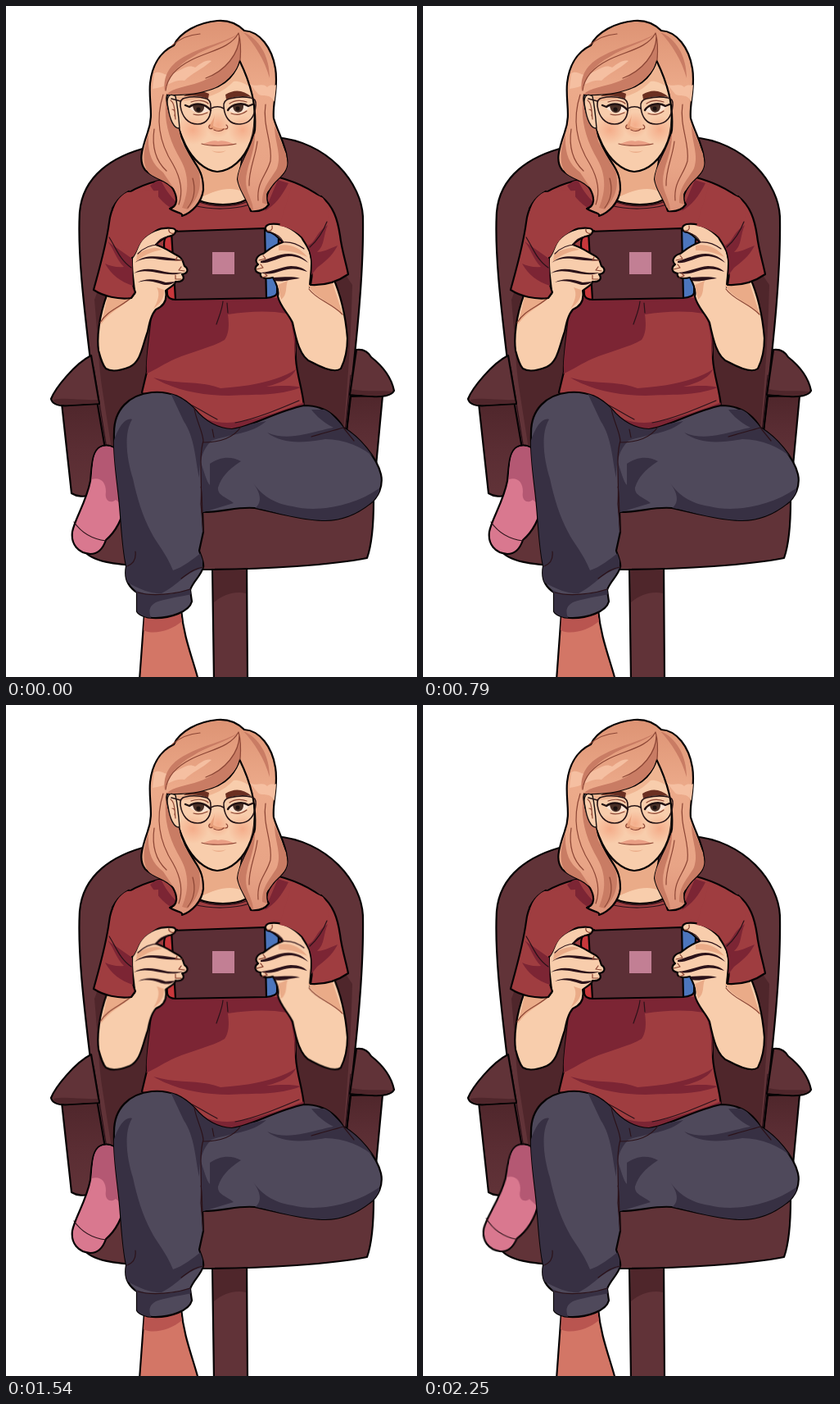
These frames come from a looping animation (502 by 818 pixels, 2500 ms). An HTML page:

```html
<!DOCTYPE html>
<html lang="en">
<head>
<meta charset="utf-8">
<title>Gaming in a chair</title>
<style>
html, body { margin: 0; width: 100%; height: 100%; overflow: hidden; background: #fff; }
svg { display: block; width: 100%; height: 100%; }
path, rect, ellipse, circle { stroke-linejoin: round; stroke-linecap: round; }
.ink { stroke: #060304; stroke-width: 2.2; }
.fine { fill: none; stroke: #2b1219; stroke-width: 1.2; }
.warm { fill: none; stroke: #8c4635; stroke-width: 1.2; }
.chair { fill: #613338; }
.chairDark { fill: #4f262b; }
.shirt { fill: #9f3d40; }
.shirtDark { fill: #7c2534; }
.pants { fill: #4f495b; }
.pantsDark { fill: #373043; }
.skin { fill: #f8cdac; }
.skinDark { fill: #eaab88; }
.hairDark { fill: #c97c64; }
.hairLight { fill: #f5bfa1; }

.arms, .console, .foot, .open, .half, .shut { animation: 2.5s step-end infinite; }
.arms { transform-origin: 0 448px; animation-name: arms; }
.console { animation-name: console; }
.foot { transform-origin: 126px 545px; animation-name: foot; }
.open { animation-name: open; }
.half { animation-name: half; opacity: 0; }
.shut { animation-name: shut; opacity: 0; }

@keyframes arms {
  0%, 18.4%, 31.6%, 48%, 61.6%, 76.4%, 90%, 100% { transform: none; }
  11.6%, 24.8%, 54.8%, 83.2% { transform: scaleY(.986); }
  41.6%, 68.4% { transform: scaleY(1.02); }
}
@keyframes console {
  0%, 18.4%, 31.6%, 48%, 61.6%, 76.4%, 90%, 100% { transform: none; }
  11.6%, 24.8%, 54.8%, 83.2% { transform: translateY(4px); }
  41.6%, 68.4% { transform: translateY(-4px); }
}
@keyframes foot {
  0%, 76.4% { transform: none; }
  70% { transform: rotate(-4deg); }
  73.2% { transform: rotate(-2deg); }
  80%, 100% { transform: rotate(4deg); }
}
@keyframes open { 0%, 26.4%, 100% { opacity: 1; } 20% { opacity: 0; } }
@keyframes half { 0%, 21.6%, 26.4%, 100% { opacity: 0; } 20%, 24.8% { opacity: 1; } }
@keyframes shut { 0%, 24.8%, 100% { opacity: 0; } 21.6% { opacity: 1; } }
</style>
</head>
<body>
<svg viewBox="0 0 502 818" preserveAspectRatio="none">
<defs>
  <linearGradient id="hair" x1="0" y1="0" x2="0" y2="1">
    <stop offset="0" stop-color="#dd9374"/><stop offset=".35" stop-color="#ecaa8a"/><stop offset=".75" stop-color="#e8a486"/><stop offset="1" stop-color="#dc9279"/>
  </linearGradient>
  <linearGradient id="post" x1="0" y1="0" x2="0" y2="1">
    <stop offset="0" stop-color="#4f262b"/><stop offset=".5" stop-color="#5a2d33"/><stop offset="1" stop-color="#613338"/>
  </linearGradient>
  <radialGradient id="blush">
    <stop offset="0" stop-color="#f3a27f" stop-opacity=".75"/><stop offset="1" stop-color="#f3a27f" stop-opacity="0"/>
  </radialGradient>
  <clipPath id="bodyClip"><path id="torso" d="M186 213C155 221 138 233 130 247L140 352L180 362C176 400 171 430 172 446L166 471L178 485L230 505L276 518L330 507L364 489C363 470 355 450 354 430C354 405 352 385 348 362L392 330L396 246C385 228 357 215 330 208Z"/></clipPath>
  <clipPath id="legClip"><path id="legs" d="M132 520C132 492 150 474 178 471C202 469 217 478 230 491C243 507 260 516 276 516C300 513 330 494 364 487C389 487 403 499 412 514C431 525 453 550 458 571C461 585 455 599 444 607C430 618 411 627 390 627C361 627 325 616 304 612C281 610 267 617 240 617L241 641L236 664C239 673 242 679 241 684C238 695 228 702 225 712L227 726C224 738 201 747 179 746C171 746 162 742 160 738L160 715C149 708 144 698 147 683C141 654 141 621 137 590C134 565 131 543 132 520Z"/></clipPath>
  <clipPath id="hairClip"><path id="locks" d="M258 18C235 20 212 32 205 48C186 57 178 76 176 94C174 117 181 133 173 154C165 177 162 190 170 200C181 211 197 212 204 223C210 234 210 244 200 247C207 252 217 252 215 256C227 252 239 240 241 224C241 211 239 203 230 190C221 177 215 163 211 149C200 139 194 122 197 108C225 109 258 104 273 88C280 80 284 72 285 66C299 95 306 120 304 151C300 176 285 190 283 211C285 225 294 233 299 250C308 251 316 249 321 242C315 234 320 224 329 214C340 204 345 198 343 186C342 170 332 154 327 137C325 120 333 99 329 76C325 51 310 31 291 30C281 20 270 17 258 18Z"/></clipPath>
</defs>

<g id="chair">
  <path class="chair ink" d="M252 680L254 822H295L294 680Z"/>
  <path class="chairDark" d="M254 688H293V716C280 713 266 717 254 727Z"/>
  <path class="ink" fill="url(#post)" d="M68 484L80 594C86 598 96 599 104 596L126 545L114 482Z"/>
  <path class="ink" fill="url(#post)" d="M421 476L460 475L452 560L414 535Z"/>
  <path class="chair ink" d="M174 172C130 183 94 207 90 251C87 302 96 372 104 440L122 545L414 535C426 425 437 337 436 260C436 216 392 164 328 160Z"/>
  <path class="chairDark" d="M108 358C112 400 113 440 118 470L129 540H410C417 470 421 410 423 340L396 300H130Z"/>
  <path class="fine" d="M107 440L123 540M421 450L414 520"/>
  <path class="chair ink" d="M104 426C84 436 60 466 55 479C57 487 67 488 78 487L114 485Z"/>
  <path class="chairDark" d="M58 480C73 477 91 481 112 480L113 484L74 486C64 486 59 484 58 480Z"/>
  <path class="chair ink" d="M428 419C436 418 442 421 446 428C460 439 471 454 474 469C471 475 459 477 447 476L420 474Z"/>
  <path class="chairDark" d="M422 467C441 471 457 468 472 470C470 474 457 475 446 475L422 473Z"/>
  <path class="chair ink" d="M122 600L97 666C109 679 138 681 180 684L240 687C320 687 400 681 441 673C447 656 449 630 449 603L240 605Z"/>
</g>

<g class="foot">
  <path class="ink" fill="#d9788f" d="M116 537C105 542 105 560 103 579C98 605 84 625 81 641C79 656 88 667 103 668C114 668 119 660 122 651C134 641 143 624 145 607L134 540C128 535 121 535 116 537Z"/>
  <path fill="#b45873" d="M116 538C105 543 106 563 105 577C116 574 122 581 122 592C120 604 128 607 134 602L143 609L133 540C127 536 121 536 116 538Z"/>
  <path class="fine" d="M83 629C92 642 106 650 122 652"/>
</g>

<path class="ink" fill="#d37666" d="M169 740L163 822H235C228 795 217 770 214 736Z"/>
<path fill="#b95550" d="M169 745L213 740L215 750C201 762 180 767 168 761Z"/>

<g id="body">
  <use href="#torso" class="shirt ink"/>
  <g clip-path="url(#bodyClip)" class="shirtDark">
    <path d="M172 356H350L360 448C350 432 355 392 343 375C322 371 296 372 271 376C273 390 272 400 267 407C252 416 228 421 207 430C193 436 184 443 170 449Z"/>
    <path d="M180 453C210 462 236 456 262 466C296 464 333 457 354 443C350 453 335 460 318 464C334 463 349 462 360 465C332 476 302 473 272 475C239 475 205 468 180 453Z"/>
    <path d="M188 210C197 230 209 241 220 248L210 251C196 245 186 234 176 219ZM316 250L332 212L345 216C337 232 328 243 316 250Z"/>
    <path d="M166 471C202 475 226 489 246 504C276 515 317 501 365 483V495L276 520Z"/>
  </g>
  <path class="fine" d="M257 388C261 376 264 370 265 360M270 362L271 374M188 474C216 477 237 493 258 504M280 508C306 503 332 492 358 481"/>
  <use href="#legs" class="pants ink"/>
  <g clip-path="url(#legClip)" class="pantsDark">
    <path d="M128 545C134 514 146 501 154 504C143 522 148 554 155 576C160 600 167 622 177 641C184 655 195 666 204 688C216 684 228 675 240 665V686C222 688 210 706 190 716C176 717 160 710 140 698Z"/>
    <path d="M158 712C176 721 203 719 226 710L227 717C207 721 194 723 183 727C174 732 174 739 178 748H158Z"/>
    <path d="M200 470C220 477 240 503 276 514L318 506C300 522 273 522 251 530C240 540 236 555 236 575C231 553 231 527 217 506Z"/>
    <path d="M319 520C346 532 376 518 400 514C388 508 380 501 373 492L392 492L413 514C435 524 445 539 453 553C435 537 413 528 390 528C362 533 337 534 319 520Z"/>
    <path d="M249 558C260 550 275 548 287 555C270 566 263 575 259 587C258 597 270 599 278 606L238 618V556C242 568 245 580 249 584Z"/>
    <path d="M302 582C313 596 325 606 350 610C377 617 421 612 456 588V606L400 630C357 629 330 616 304 612C314 605 310 592 302 582Z"/>
  </g>
  <path class="fine" d="M230 491C233 507 240 518 241 530C235 551 240 581 238 607L241 641M241 532C262 532 278 526 287 513M412 514C399 518 386 521 373 525M412 514L425 530M240 617C239 607 240 596 238 586M161 715C179 720 207 717 225 711M148 683C156 680 159 673 158 665M241 684C230 685 221 693 214 698M252 516L254 526"/>
</g>

<g class="console">
  <path class="ink" fill="#c8373b" d="M209 274C199 275 193 281 193 291L197 352Q198 358 208 358Z"/>
  <path class="ink" fill="#4c76bd" d="M315 271C328 270 333 275 333 283L331 350Q330 355 317 356Z"/>
  <path class="ink" fill="#5c2f36" d="M202 275L316 271L318 356L207 358Z"/>
  <rect x="252" y="300" width="27" height="27" fill="#c27f94"/>
</g>

<g class="arms">
  <path class="skin ink" d="M124 350C113 379 111 405 113 420C116 431 118 438 122 442C130 447 141 444 151 440C165 433 166 416 173 397C175 387 177 377 183 370C193 366 197 358 195 347C201 342 207 340 207 336C216 337 219 332 215 327C223 326 223 320 218 317C216 313 217 308 209 304C200 299 193 294 183 291C188 286 193 283 198 281C207 280 211 272 203 271C188 269 174 276 166 285C160 292 160 300 154 307C153 323 157 340 157 351Z"/>
  <path class="skinDark" d="M157 347C153 364 126 370 116 389L124 354Z"/>
  <path class="skinDark" d="M160 303C168 297 181 292 191 297C179 299 167 304 159 312ZM180 369C190 362 194 354 193 346L184 343C189 351 185 361 180 369Z"/>
  <path fill="#2b1219" d="M157 313C169 303 181 305 192 306C202 307 209 309 216 310C205 311 196 310 188 309C176 307 167 307 157 313ZM156 326C167 318 181 321 194 324C203 326 210 325 216 325C206 329 194 327 184 325C174 323 165 322 156 326ZM161 337C171 331 184 333 195 337L207 336C201 341 194 341 187 338C178 335 169 334 161 337Z"/>
  <path class="warm" d="M115 386C124 370 143 366 156 353"/>
  <path class="fine" d="M161 302C170 293 178 291 186 291M198 281C191 282 186 286 183 291"/>
  <path class="warm" d="M199 272C198 276 202 278 205 277M209 306L207 310L215 310M214 318L211 322L218 323M207 328L207 333L214 333"/>
  <path class="skin ink" d="M399 330C409 352 415 381 417 405C417 420 413 434 409 442C402 448 386 441 373 434C359 429 354 405 350 386C345 375 335 367 332 354C334 346 330 338 326 331C318 333 309 332 311 326C303 325 303 318 308 315C303 311 306 304 314 302C321 297 328 291 338 288C333 283 329 278 323 276C315 275 315 268 322 266C338 264 352 273 361 282C365 290 371 295 373 307C374 322 371 333 371 343Z"/>
  <path class="skinDark" d="M369 340C376 356 399 361 412 378L399 338Z"/>
  <path class="skinDark" d="M333 292C346 289 360 295 368 306C355 300 345 298 333 298ZM336 358C344 352 341 343 344 335L332 340Z"/>
  <path fill="#2b1219" d="M311 311C323 308 333 302 345 302C356 302 364 307 369 313C357 305 348 304 339 306C329 309 320 314 311 313ZM311 325C325 324 336 318 348 317C358 317 364 320 368 324C354 319 345 320 336 323C328 326 319 328 311 325ZM326 331C338 331 348 329 359 332C347 333 339 337 329 335Z"/>
  <path class="warm" d="M370 345C379 358 397 362 411 376"/>
  <path class="fine" d="M338 288C348 287 356 290 364 296M323 276C332 278 337 284 339 288"/>
  <path class="warm" d="M325 268C326 272 324 275 319 274M314 304L317 308L309 310M311 315L314 319L306 321M316 326L319 329L313 331"/>
</g>

<g id="sleeves">
  <path class="shirt ink" d="M150 226C137 233 128 246 126 264C122 294 114 320 107 346C119 354 137 358 153 356L158 349C152 335 153 318 154 307"/>
  <path class="shirtDark" d="M124 287C132 296 134 308 144 318C136 319 127 317 121 314C129 328 140 336 155 341L154 308Z"/>
  <path class="shirt" d="M148 227C138 232 131 242 130 256L130 287L155 306C161 299 160 291 171 281L186 271V225Z"/>
  <path class="fine" d="M126 282C134 294 139 310 153 319"/>
  <path class="shirt ink" d="M385 232C400 244 405 260 408 280C410 297 415 312 418 327C405 336 389 341 372 340C375 325 374 311 371 299"/>
  <path class="shirtDark" d="M393 267C378 276 379 288 368 292C375 304 374 318 373 328L380 319C395 308 401 300 405 292C393 297 386 300 380 300C390 291 387 280 393 267Z"/>
  <path class="shirt" d="M350 216L387 234C395 245 395 258 391 267C378 274 379 288 369 291C362 278 347 270 334 268Z"/>
  <path class="fine" d="M392 263C387 276 380 286 371 294"/>
</g>

<g id="head">
  <path class="skin ink" d="M235 185L239 224L233 236C252 244 279 244 294 236L284 216L288 180Z"/>
  <path class="skinDark" d="M230 188C243 200 254 203 270 201L287 188L283 212L288 226C272 219 254 226 239 233L241 211Z"/>
  <path class="fine" d="M231 237C251 246 277 246 296 238M229 243C251 249 279 248 298 242"/>
  <path class="skin ink" d="M204 104C201 130 211 151 219 169C228 187 243 201 258 202C275 201 291 187 299 165C306 145 306 112 294 76L282 55Z"/>
  <ellipse cx="228" cy="151" rx="20" ry="18" fill="url(#blush)"/>
  <ellipse cx="289" cy="151" rx="18" ry="18" fill="url(#blush)"/>
  <ellipse cx="259" cy="145" rx="15" ry="16" fill="url(#blush)"/>
  <path fill="#e9a681" opacity=".6" d="M204 108C237 112 268 97 285 68L297 98C291 94 283 91 278 92C262 109 238 115 212 116Z"/>
  <path fill="#6b3022" d="M217 110C227 102 237 102 248 107L247 113C237 109 228 109 217 110ZM268 108C279 101 290 102 300 111C289 109 279 110 269 114Z"/>
  <g class="open">
    <path fill="#fbe3d3" d="M223 123C231 118 243 119 249 127C241 132 229 132 223 123ZM271 127C276 119 290 118 298 122C292 131 280 133 271 127Z"/>
    <path fill="#4a3027" d="M228 121C234 118 239 119 242 122C243 132 229 134 228 121ZM277 121C282 118 287 118 290 121C291 132 277 133 277 121Z"/>
    <circle cx="235" cy="126" r="2.6" fill="#1b1110"/><circle cx="283" cy="125" r="2.6" fill="#1b1110"/>
    <path fill="none" stroke="#211213" stroke-width="2.4" d="M219 121L224 123C232 117 243 119 250 127M271 127C276 119 289 117 296 122L301 120"/>
    <path class="warm" d="M229 132C236 134 242 132 246 130M275 131C283 134 290 131 294 128M226 117C234 114 243 115 247 119M273 119C280 114 289 115 294 117"/>
  </g>
  <g class="half">
    <path fill="#fbe3d3" d="M223 124C231 121 243 123 250 127C241 133 229 132 223 124ZM271 127C278 122 290 121 298 124C291 132 280 133 271 127Z"/>
    <path fill="#4a3027" d="M229 123H241C240 133 230 133 229 123ZM278 123H290C289 133 279 133 278 123Z"/>
    <path fill="none" stroke="#211213" stroke-width="2.4" d="M219 124L224 124C233 121 243 123 250 127M271 127C279 122 289 121 296 124L301 123"/>
    <path class="warm" d="M226 117C235 113 243 116 248 120M272 120C279 114 289 114 295 118"/>
  </g>
  <g class="shut">
    <path fill="#efb18e" d="M222 125C230 115 242 116 251 126C243 131 230 131 222 125ZM270 126C277 116 290 115 299 124C291 131 279 131 270 126Z"/>
    <path fill="none" stroke="#211213" stroke-width="2.3" d="M219 125L225 127C234 130 243 129 251 126M223 130L229 128M271 126C280 130 289 129 295 127L302 124M291 128L298 130"/>
    <path class="warm" d="M226 120C234 116 243 117 248 121M273 121C280 116 289 116 294 120"/>
  </g>
  <path fill="#e8a07b" d="M255 132C254 140 247 145 248 149C257 153 265 153 271 149C263 149 258 150 253 146Z"/>
  <path class="warm" d="M249 145C246 148 249 151 252 149M254 151C258 153 263 153 266 150M269 145C272 147 271 150 268 150"/>
  <path fill="#e99e84" d="M241 168C249 165 255 163 259 165C265 163 273 166 280 169C267 171 253 171 241 168Z"/>
  <path class="warm" d="M239 168C249 171 268 171 281 168"/>
  <path class="skinDark" d="M251 176C256 178 264 178 269 176C264 180 256 180 251 176Z"/>

  <use href="#locks" fill="url(#hair)" class="ink"/>
  <g clip-path="url(#hairClip)">
    <path class="hairLight" d="M181 82C190 77 194 88 204 82C215 78 222 70 231 75C238 70 244 65 251 67C238 78 227 82 218 91C204 89 197 99 179 101ZM297 94C305 101 313 92 319 99C324 94 328 99 331 95L328 117C321 104 312 113 307 106Z"/>
    <path class="hairDark" d="M285 36C283 62 262 84 236 93C220 99 204 99 196 108L206 110C240 109 265 101 282 76L287 62ZM284 34C268 46 246 50 228 62C210 72 199 84 194 104C191 85 201 70 219 61C241 49 264 45 284 34ZM290 32C308 39 322 60 322 88C316 66 304 47 290 32Z"/>
    <path class="hairDark" d="M197 108C191 132 197 160 213 187C222 203 225 222 215 246L222 248C235 234 239 222 236 203L214 165L211 149C200 140 195 122 197 108ZM174 156C173 178 177 192 192 203L204 221L188 213C169 205 163 190 174 156ZM304 155C305 182 289 201 294 222C297 233 302 240 302 250L289 237L280 211ZM328 146C328 166 337 180 331 198C322 214 313 220 313 240L319 242L318 228L345 197L342 180Z"/>
  </g>
  <path class="warm" d="M284 33C274 52 247 55 226 66C208 75 197 86 195 103M285 37C285 58 268 79 244 88M286 66C287 54 287 43 284 33M192 108C182 139 188 168 204 193C213 209 217 225 211 242M181 150C178 171 183 189 196 201M317 120C313 146 326 168 323 189C318 207 306 214 308 237M307 165C305 184 296 200 297 219M203 48C212 40 224 35 237 34M228 210C232 224 229 237 222 246"/>
  <path class="skin" stroke="#171010" stroke-width="1.4" d="M207 110C199 105 195 112 198 124C200 138 205 150 212 149C211 137 210 124 207 110Z"/>
  <path class="warm" d="M201 115C206 118 206 128 207 138M203 126C206 126 207 130 206 134"/>
  <g fill="none" stroke="#251416" stroke-width="1.6">
    <path d="M219 112C228 110 238 111 245 113Q250 115 250 122C251 134 246 144 234 144C222 144 215 135 213 122Q212 113 219 112ZM273 113C281 111 291 110 299 112Q306 113 305 121C304 134 299 143 286 144C273 145 267 135 266 123Q265 115 273 113Z"/>
    <path d="M250 125C256 122 261 122 266 125M213 116L202 113"/>
  </g>
</g>
</svg>
</body>
</html>
```
